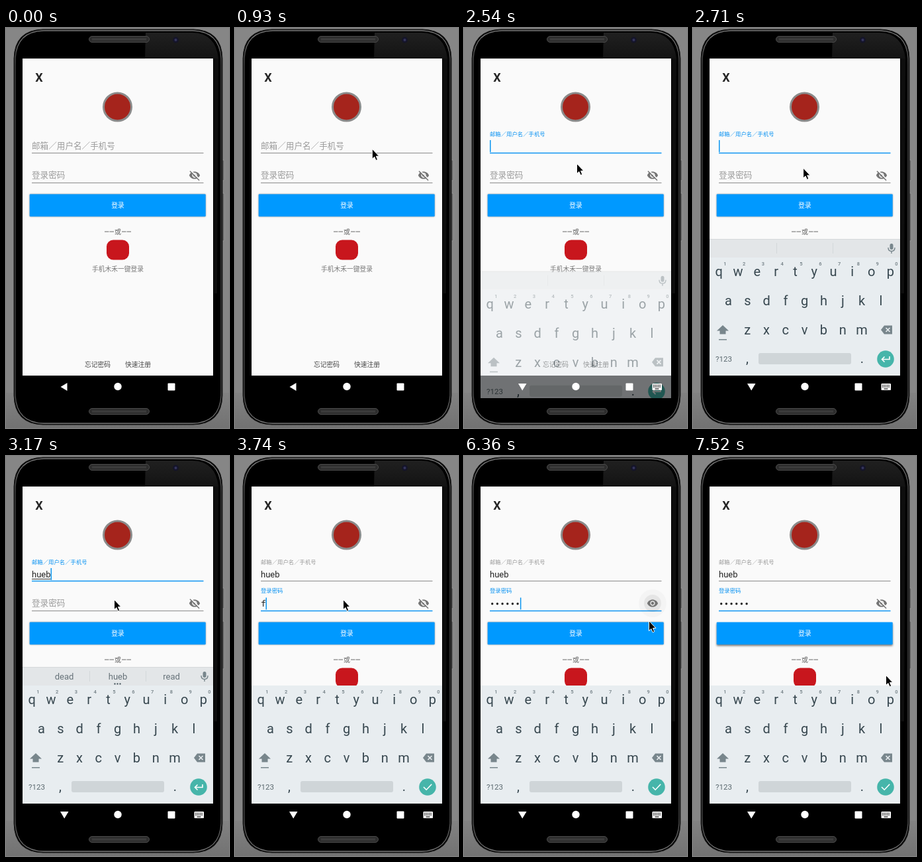
These frames come from a looping animation (337 by 603 pixels, 8 s). An HTML page:

```html
<!DOCTYPE html>
<html lang="zh">
<head>
<meta charset="utf-8">
<title>Login form</title>
<style>
  html, body { margin: 0; width: 100%; height: 100%; overflow: hidden; background: #868686; }
  svg { display: block; width: 337px; height: 603px; }
  text { font-family: Roboto, "Noto Sans CJK SC", "Noto Sans CJK", sans-serif; white-space: pre; }
  .cjk { font-family: "Noto Sans CJK SC", "Noto Sans CJK", sans-serif; }
  .mid { text-anchor: middle; }
  .mono { font-family: "Noto Sans Mono", monospace; font-size: 12.8px; }
  .key { font-size: 20px; fill: #37474f; }
  .num { font-size: 7.5px; font-weight: 500; fill: #6f7c82; }
  .word { font-size: 13px; fill: #667279; }
</style>
</head>
<body>
<svg viewBox="0 0 337 603">
  <defs>
    <linearGradient id="floor" x1="0" y1="0" x2="0" y2="1">
      <stop offset="0" stop-color="#828282"/><stop offset="1" stop-color="#727272"/>
    </linearGradient>
    <linearGradient id="gloss" x1="0" y1="0" x2="0" y2="1">
      <stop offset="0" stop-color="#202020"/><stop offset="1" stop-color="#131313"/>
    </linearGradient>
    <linearGradient id="rim" x1="0" y1="0" x2="0" y2="1">
      <stop offset="0" stop-color="#7a7a7a"/><stop offset=".09" stop-color="#484848"/>
      <stop offset=".91" stop-color="#484848"/><stop offset="1" stop-color="#7a7a7a"/>
    </linearGradient>
    <clipPath id="display"><rect x="25" y="46" width="288" height="512"/></clipPath>
  </defs>

  <g id="phone">
    <rect width="337" height="603" fill="#868686"/>
    <rect y="550" width="337" height="53" fill="url(#floor)"/>
    <rect x="326" y="199" width="4" height="31" rx="1.5" fill="#6a6a6a" stroke="#a5a5a5" stroke-width=".7"/>
    <rect x="326" y="249" width="4" height="72" rx="1.5" fill="#6a6a6a" stroke="#a5a5a5" stroke-width=".7"/>
    <path d="M56 2H283Q326 3 327 46V554Q326 597 283 598H56Q13 597 12 554V46Q13 3 56 2Z" fill="#000" stroke="#222"/>
    <path d="M57 4H282Q323 5 325 46V554Q323 595 282 596H57Q16 595 14 554V46Q16 5 57 4Z" fill="none" stroke="url(#rim)" stroke-width="1.300"/>
    <path d="M211 7H282Q317 8 321 46H210Z" fill="url(#gloss)"/>
    <path d="M314 46H321L319 400H314Z" fill="#0e0e0e"/>
    <g fill="#2d2d2d" stroke="#4b4b4b">
      <rect x="125.500" y="12.500" width="91" height="9" rx="4.500"/>
      <rect x="125.500" y="573.500" width="91" height="9" rx="4.500"/>
    </g>
    <path d="M130 17H212M130 578H212" stroke="#3d3d3d" stroke-width="3"/>
    <circle cx="256.500" cy="18" r="4.500" fill="#15152a"/>
    <circle cx="256.500" cy="18" r="2" fill="#34345c"/>
  </g>

  <g id="form">
    <rect x="25" y="46" width="288" height="478" fill="#fafafa"/>
    <text class="mid" x="50" y="80.500" font-size="18" font-weight="700" fill="#262626">X</text>
    <circle cx="168.500" cy="119" r="21" fill="#a5241c" stroke="#8b8b8b" stroke-width="3"/>

    <text id="userLabel" class="cjk" x="39">邮箱／用户名／手机号</text>
    <text id="userText" x="39" y="183" font-size="13" fill="#222"></text>
    <path id="composing" stroke="#333" stroke-width="1"/>
    <path id="userLine" d="M39 188.500H298.500"/>

    <text id="passLabel" class="cjk" x="39">登录密码</text>
    <g id="dots" fill="#222"></g>
    <text id="passText" class="mono" y="227" fill="#222"></text>
    <path id="passLine" d="M39 233.500H298.500"/>
    <g id="ripple">
      <circle cx="285" cy="222" r="21" fill="#000" opacity=".025"/>
      <circle cx="285" cy="222" r="13" fill="#000" opacity=".06"/>
    </g>
    <g transform="translate(285 222) scale(.74) translate(-12 -12)">
      <path fill="#757575" d="M12 4.500C7 4.500 2.730 7.610 1 12c1.730 4.390 6 7.500 11 7.500s9.270-3.110 11-7.500c-1.730-4.390-6-7.500-11-7.500zM12 17c-2.760 0-5-2.240-5-5s2.240-5 5-5 5 2.240 5 5-2.240 5-5 5zm0-8c-1.660 0-3 1.340-3 3s1.340 3 3 3 3-1.340 3-3-1.340-3-3-3z"/>
      <path id="strikeGap" stroke="#fafafa" stroke-width="2.200"/>
      <path id="strike" stroke="#757575" stroke-width="2"/>
    </g>
    <rect id="caret" width="1.500" height="18" fill="#0a95f0"/>

    <rect id="button" x="35.700" y="250.600" width="266" height="33.600" rx="1" fill="#09f"/>
    <text class="cjk mid" x="169" y="271" font-size="9.700" fill="#fff">登录</text>
    <path d="M149 307h6.500m1 0h6.500m12 0h6.500m1 0h6.500" stroke="#666"/>
    <text class="cjk mid" x="169" y="310.500" font-size="10" fill="#666">或</text>
    <rect x="152" y="319.500" width="34" height="30" rx="10" fill="#c8161d"/>
    <g class="cjk" font-size="9.750">
      <text x="130" y="366.500" fill="#777">手机木禾一键登录</text>
      <text x="119" y="511" fill="#444">忘记密码</text>
      <text x="180" y="511" fill="#444">快速注册</text>
    </g>
  </g>
  <rect x="25" y="524" width="288" height="34" fill="#000"/>

  <g clip-path="url(#display)"><g id="keyboard">
    <rect x="25" y="346" width="288" height="178" fill="#e8edf0"/>
    <g id="bar">
      <rect x="25" y="318" width="288" height="28" fill="#e3e6e8"/>
      <path d="M25 318.500H313" stroke="#d5d8da"/>
      <path d="M126.500 324V340M211.500 324V340" stroke="#d3d8da"/>
      <g fill="#78868c">
        <rect x="297.500" y="325" width="5" height="9" rx="2.500"/>
        <path d="M295 331q0 5.500 5 5.500t5-5.500M300 336v4" fill="none" stroke="#78868c" stroke-width="1.400"/>
      </g>
      <g id="words" class="mid">
        <text class="word" x="88" y="337"></text>
        <text class="word" x="169" y="337"></text>
        <text class="word" x="250" y="337"></text>
        <path d="M163.500 343.500h2m2 0h2m2 0h2" stroke="#37474f" stroke-width="2"/>
      </g>
    </g>
    <g id="keys" class="mid"></g>
    <g fill="#78868c">
      <path d="M45 448l9 8.500h-4.500v5h-9v-5H36z"/>
      <rect x="39" y="469" width="12" height="1.500"/>
      <path d="M284 455l5-6.500h12v13h-12z"/>
    </g>
    <path d="M291.500 452l6 6m0-6l-6 6" stroke="#e8edf0" stroke-width="1.600"/>
    <rect x="99" y="490" width="140" height="17" rx="3" fill="#cfd5d8"/>
    <circle cx="291" cy="499" r="12.800" fill="#46b5aa"/>
    <g fill="none" stroke="#fff" stroke-width="1.600">
      <path id="enterIcon" d="M297 495v4.500H285.500M289.500 495.500l-4 4 4 4"/>
      <path id="checkIcon" d="M285 499l4.200 4.200 8-8.400"/>
    </g>
  </g></g>

  <g id="nav" fill="#fff">
    <path id="back"/>
    <circle cx="169" cy="540.500" r="5.700"/>
    <rect x="244.500" y="535.500" width="11" height="11" rx="1"/>
    <g id="imeIcon">
      <rect x="284.500" y="536" width="14.500" height="10" rx="1"/>
      <path d="M286 538.500H298M286 541H298" stroke="#111" stroke-width="1.300" stroke-dasharray="1.400 1"/>
      <path d="M288.500 544h6" stroke="#111" stroke-width="1.200"/>
    </g>
  </g>
  <path id="pointer" d="M0 0V15.200L3.400 12 5.700 17.300 8.200 16.200 6 11H10.400Z" fill="#000" stroke="#fff"/>
</svg>

<script>
const LOOP = 8000;
const USER = "hueb";
const PASSWORD = "fasfsd";
const CELL = 7.68;
const BLUE = "#0d94f2", GREY = "#9b9b9b";

const $ = id => document.getElementById(id);
const set = (el, attrs) => { for (const k in attrs) el.setAttribute(k, attrs[k]); };
const show = (el, on) => el.setAttribute("visibility", on ? "inherit" : "hidden");
const progress = (t, a, b) => Math.min(1, Math.max(0, (t - a) / (b - a)));
const ease = k => k * k * (3 - 2 * k);
const mix = (a, b, k) => a + (b - a) * k;
const within = (t, a, b) => t >= a && t < b;
const countPast = (t, times) => times.filter(s => t >= s).length;

function add(parent, tag, attrs, text = "") {
  const el = document.createElementNS("http://www.w3.org/2000/svg", tag);
  set(el, attrs);
  el.textContent = text;
  parent.append(el);
  return el;
}

function keyRow(letters, x, y) {
  [...letters].forEach((c, i) => add($("keys"), "text", { class: "key", x: x + 28.8 * i, y }, c));
}
keyRow("qwertyuiop", 39.2, 374);
keyRow("asdfghjkl", 53.5, 418);
keyRow("zxcvbnm", 82.2, 462);
[..."1234567890"].forEach((c, i) =>
  add($("keys"), "text", { class: "num", x: 48.3 + 28.8 * i, y: 358 }, c));
add($("keys"), "text", { class: "key", x: 46.5, y: 503, style: "font-size:11.5px;fill:#5b696f" }, "?123");
add($("keys"), "text", { class: "key", x: 82, y: 505 }, ",");
add($("keys"), "text", { class: "key", x: 255.5, y: 505 }, ".");

const dots = [...PASSWORD].map((_, i) =>
  add($("dots"), "circle", { cx: 42.7 + CELL * i, cy: 222.7, r: 1.7 }));
const words = [...$("words").querySelectorAll("text")];

// Pointer stops: time, x, y
const PATH = [
  [600, 299, 154], [950, 206, 182], [1550, 206, 182], [1850, 184, 169], [2250, 184, 169],
  [2540, 170, 204], [2620, 170, 204], [2790, 163, 216], [4720, 163, 216], [4870, 275, 206],
  [4990, 275, 206], [5160, 279, 222], [6240, 279, 222], [6360, 279, 248], [6420, 279, 248],
  [6590, 248, 266], [7300, 248, 266], [7400, 305, 300], [7520, 291, 330]
];

function drawPointer(t) {
  const next = PATH.findIndex(p => p[0] > t);
  const [t0, x0, y0] = PATH[next < 0 ? PATH.length - 1 : Math.max(0, next - 1)];
  const [t1, x1, y1] = PATH[next < 0 ? PATH.length - 1 : next];
  const k = t1 > t0 ? ease(progress(t, t0, t1)) : 0;
  show($("pointer"), t >= PATH[0][0]);
  set($("pointer"), { transform: `translate(${mix(x0, x1, k) + 0.5} ${mix(y0, y1, k) + 0.5})` });
}

function drawField(name, restY, floatY, lift, focused) {
  set($(name + "Label"), {
    y: mix(restY, floatY, lift),
    "font-size": mix(12.6, 8.4, lift),
    fill: focused ? BLUE : GREY
  });
  set($(name + "Line"), {
    stroke: focused ? BLUE : "#8a8a8a",
    "stroke-width": focused ? 1.6 : 1
  });
}

function drawForm(t) {
  const onPass = t >= 3420;
  const onUser = t >= 2080 && !onPass;
  drawField("user", 181.7, 162.7, ease(progress(t, 2080, 2280)), onUser);
  drawField("pass", 226, 206, ease(progress(t, 3420, 3600)), onPass);

  const typed = countPast(t, [2850, 2950, 3050, 3170]);
  $("userText").textContent = USER.slice(0, typed);
  const userEnd = 39 + (typed ? $("userText").getComputedTextLength() : 0);
  set($("composing"), { d: `M39 185.500H${userEnd}` });
  show($("composing"), onUser && typed > 0);

  const count = countPast(t, [3680, 3790, 3940, 4060, 4210, 4390]);
  const revealed = within(t, 5520, 6240);
  const masked = t >= 6240 ? count : Math.max(0, count - 1);
  dots.forEach((dot, i) => show(dot, !revealed && i < masked));
  const from = revealed ? 0 : masked;
  $("passText").textContent = PASSWORD.slice(from, count);
  set($("passText"), { x: 39 + CELL * from });

  const blinkOff = within(t, 4720, 5130) || within(t, 5950, 6240) || t >= 6770;
  show($("caret"), (onUser || onPass) && !blinkOff);
  set($("caret"), onPass ? { x: 38.8 + CELL * count, y: 213.5 } : { x: userEnd, y: 169 });

  const cut = 1 - ease(progress(t, 5520, 5770)) + ease(progress(t, 6380, 6590));
  const end = 19 * cut;
  set($("strike"), { d: `M2.500 3.500l${end} ${end}` });
  set($("strikeGap"), { d: `M4 2l${end} ${end}` });
  show($("strike"), cut > 0);
  show($("strikeGap"), cut > 0);
  set($("ripple"), { opacity: progress(t, 6240, 6300) * (1 - progress(t, 6430, 6590)) });

  const raise = progress(t, 6760, 6820);
  $("button").style.filter =
    `drop-shadow(0 ${mix(0.8, 2, raise)}px ${mix(0.8, 1.8, raise)}px rgba(0,0,0,${mix(0.42, 0.52, raise)}))`;
}

function drawKeyboard(t) {
  const k = progress(t, 2430, 2660);
  const open = t >= 2430;
  const onPass = t >= 3480;
  set($("keyboard"), { opacity: k, transform: `translate(0 ${94 * (1 - k)})` });
  show($("keyboard"), open);
  show($("bar"), !onPass);
  show($("enterIcon"), !onPass);
  show($("checkIcon"), onPass);

  const typed = countPast(t, [2850, 2950, 3050, 3170]);
  show($("words"), typed > 0 && !onPass);
  ["dead", USER.slice(0, typed), "read"].forEach((w, i) => { words[i].textContent = w; });

  set($("back"), { d: open ? "M82 536H94.500L88.200 546.500Z" : "M82.500 541L92.500 535V547Z" });
  show($("imeIcon"), open);
}

const start = performance.now();
function frame() {
  const t = (performance.now() - start) % LOOP;
  drawForm(t);
  drawKeyboard(t);
  drawPointer(t);
  requestAnimationFrame(frame);
}
frame();
</script>
</body>
</html>
```
